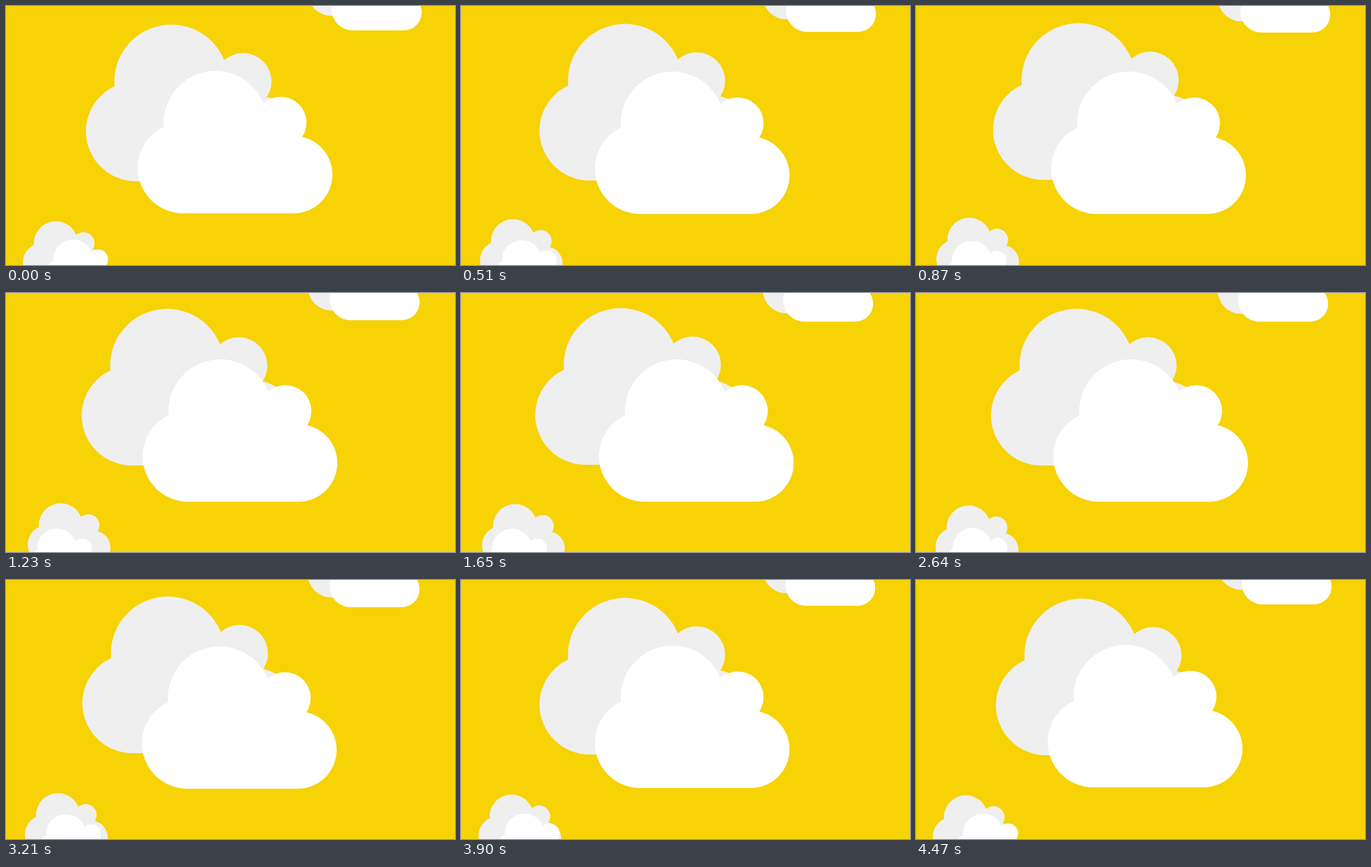
Animation of 641x371 px, one loop 4.5 s. Source, as an HTML page with a canvas:

```html
<!DOCTYPE html>
<html lang="en">
<head>
<meta charset="utf-8">
<title>Drifting clouds</title>
<style>
  html, body { margin: 0; width: 100%; height: 100%; overflow: hidden; background: #f7d204; }
  canvas { display: block; }
</style>
</head>
<body>
<canvas id="sky" width="641" height="371"></canvas>
<script>
const LOOP = 4500;
const GREY = '#efefef', WHITE = '#fff';
const ctx = document.getElementById('sky').getContext('2d');

// Cloud outline, measured from its lower left corner
const cloud = new Path2D();
for (const [x, y, r] of [[65, -65, 65], [111, -130, 74], [204, -130, 37], [222.5, -55.5, 55.5]]) {
  cloud.moveTo(x + r, y);
  cloud.arc(x, y, r, 0, 2 * Math.PI);
}
cloud.rect(65, -104, 157.5, 104);

// dx, dy: farthest drift; peak: share of the loop at which it is reached
const clouds = [
  { x: 114.1, y: 251.1, size: 1.1, dx: -10, dy: -6, peak: .45, color: GREY },
  { x: 188, y: 297, size: 1, dx: 11, dy: 3, peak: .45, color: WHITE },
  { x: 431, y: 14, size: .508, dx: 0, dy: 20, peak: .48, color: GREY },
  { x: 465, y: 34.9, size: .462, dx: -6, dy: 8, peak: .48, color: WHITE },
  { x: 24, y: 394.9, size: .425, dx: 7, dy: -7, peak: .27, color: GREY },
  { x: 53.35, y: 412.9, size: .385, dx: -26, dy: 3, peak: .3, color: WHITE },
];

function draw() {
  const t = performance.now() % LOOP / LOOP;
  ctx.setTransform(1, 0, 0, 1, 0, 0);
  ctx.fillStyle = '#f7d204';
  ctx.fillRect(0, 0, 641, 371);
  for (const { x, y, size, dx, dy, peak, color } of clouds) {
    const k = t < peak ? t / peak : (1 - t) / (1 - peak);
    // Clouds move in whole pixels
    ctx.setTransform(size, 0, 0, size, Math.round(x + dx * k), Math.round(y + dy * k));
    ctx.fillStyle = color;
    ctx.fill(cloud);
  }
  requestAnimationFrame(draw);
}
draw();
</script>
</body>
</html>
```
